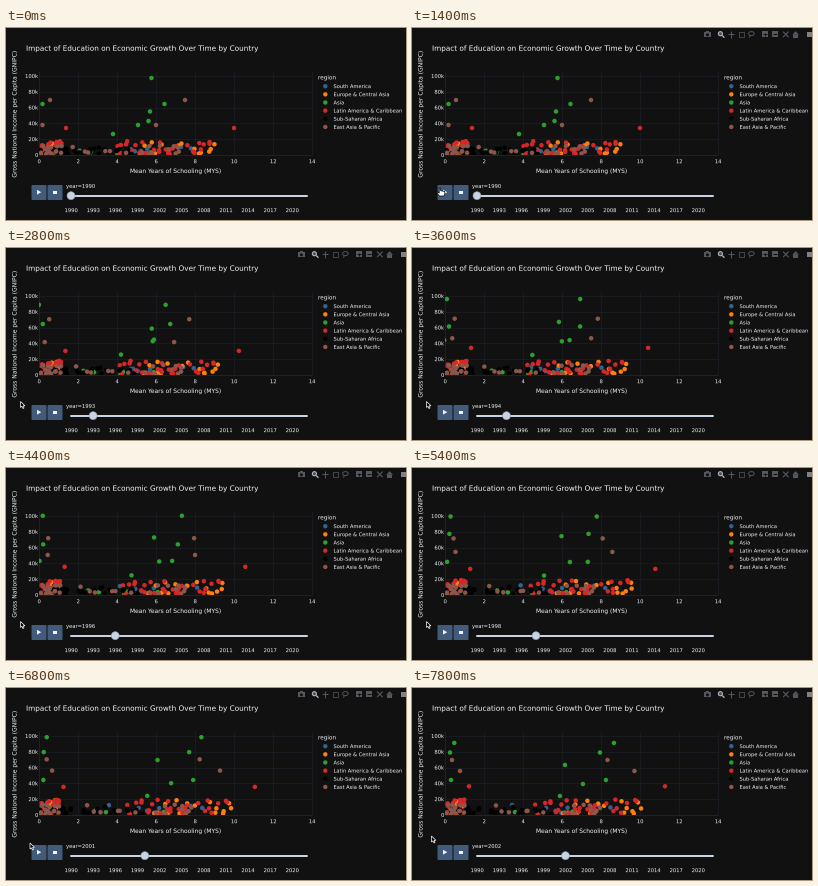
Write a matplotlib script that moves like this. It is 400 px wide and 192 px high and loops after 8000 ms.

```python
import numpy as np
import matplotlib.pyplot as plt
from matplotlib.animation import FuncAnimation
from matplotlib.patches import Circle, FancyBboxPatch, PathPatch, Polygon, Rectangle
from matplotlib.textpath import TextPath
from matplotlib.transforms import Affine2D

W, H, DPI = 400, 192, 100
STEP, FRAMES = 200, 40
PX = 72 / DPI
BG, INK, GRID, PALE = "#111111", "#f2f5fa", "#1c2229", "#c8d4e3"
LEFT, RIGHT, TOP, BASE = 33, 306, 43, 127.3
X_UNIT, Y_UNIT = 19.5, 0.79

# Playback: one year every PERIOD ms, dots glide, the slider hops quickly
PLAY, PERIOD, GLIDE, HOP = 1590, 520, 500, 150
SPAN = 12
YEAR_PX = 7.37

REGIONS = [("South America", "#35618f"), ("Europe & Central Asia", "#ff7f0e"),
           ("Asia", "#2ca02c"), ("Latin America & Caribbean", "#d62728"),
           ("Sub-Saharan Africa", "#000000"), ("East Asia & Pacific", "#8c564b")]
BLUE, ORANGE, GREEN, RED, BLACK, BROWN = range(6)

fig = plt.figure(figsize=(W / DPI, H / DPI), dpi=DPI, facecolor=BG)
ax = fig.add_axes([0, 0, 1, 1])
ax.set_xlim(0, W)
ax.set_ylim(H, 0)
ax.axis("off")


def text_path(s, x, y, size, align=0.0, turn=0):
    path = TextPath((0, 0), s, size=size, prop={"family": "DejaVu Sans"})
    width = path.get_extents().x1
    place = (Affine2D().translate(-align * width, -0.365 * size)
             .rotate_deg(turn).scale(1, -1).translate(x, y))
    return path.transformed(place)


def label(*args, **kw):
    return ax.add_patch(PathPatch(text_path(*args, **kw), fc=INK, lw=0, zorder=4))


def line(xs, ys, color, px, z=1):
    return ax.plot(xs, ys, color=color, lw=px * PX, zorder=z,
                   solid_capstyle="butt")[0]


# Plot area
for k in range(0, 15, 2):
    x = LEFT + k * X_UNIT
    line([x, x], [TOP, BASE], GRID, 0.6 if k else 1)
    label(str(k), x, 133.3, 5.2, align=0.5)
for k in range(0, 101, 20):
    y = 127 - k * Y_UNIT
    line([LEFT, RIGHT], [y, y], GRID, 0.6 if k else 1)
    label(f"{k}k" if k else "0", 32, y, 5.2, align=1)

label("Impact of Education on Economic Growth Over Time by Country", 20, 20.1, 7.26)
label("Mean Years of Schooling (MYS)", 169.3, 142.8, 5.94, align=0.5)
label("Gross National Income per Capita (GNIPC)", 8.3, 86.5, 6.03, align=0.5, turn=90)

# Legend
label("region", 312, 49.3, 5.7)
for i, (name, color) in enumerate(REGIONS):
    y = 58.2 + 8.15 * i
    ax.add_patch(Circle((319.3, y), 2.2, fc=color, lw=0))
    label(name, 327.5, y, 5.1)

# Buttons and slider
for x in (25.5, 41.5):
    ax.add_patch(FancyBboxPatch((x + 1, 158), 13, 13, fc="#435b7b", lw=0,
                                boxstyle="round,pad=1,rounding_size=1"))
ax.add_patch(Polygon([(31, 161.8), (31, 166.6), (35.3, 164.2)], fc=INK, lw=0))
ax.add_patch(Rectangle((47.2, 162.5), 3.4, 3.4, fc=INK, lw=0))
ax.plot([65, 301], [167.7, 167.7], color=PALE, lw=2 * PX, zorder=2,
        solid_capstyle="round")
for k in range(0, 31, 3):
    label(str(1990 + k), 65 + k * YEAR_PX, 182.2, 5.2, align=0.5)
knob = ax.add_patch(Circle((65, 167.7), 4, fc=PALE, ec="#8f9bab", lw=0.4, zorder=3))
year_text = label("year=1990", 60, 158, 5.2)

# Toolbar shown while the pointer is over the chart
DIM, LIT = "#55595f", "#b4b8be"
bar = []


def solid(shape, color=DIM):
    shape.set(fc=color, lw=0)
    bar.append(ax.add_patch(shape))


def stroke(xs, ys, color=DIM, px=1.0):
    bar.append(line(xs, ys, color, px, z=3))


def zoom_icon(x, plus):
    solid(Rectangle((x - 3, 3.4), 6, 6))
    stroke([x - 1.8, x + 1.8], [6.4, 6.4], BG)
    if plus:
        stroke([x, x], [4.6, 8.2], BG)


# camera, magnifier
solid(Rectangle((292, 4.3), 6.8, 5))
solid(Rectangle((294, 3.3), 2.8, 1.2))
solid(Circle((295.4, 6.8), 1.5), BG)
solid(Circle((308.4, 5.7), 2.6), LIT)
solid(Circle((308.4, 5.7), 1.5), "#4a4d52")
stroke([310.2, 312.4], [7.5, 9.7], LIT, 1.3)
# pan, box, lasso
stroke([316, 322.4], [6.4, 6.4])
stroke([319.2, 319.2], [3.1, 9.7])
stroke([326.8, 332.4, 332.4, 326.8, 326.8], [3.7, 3.7, 9.2, 9.2, 3.7], px=0.7)
turn = np.linspace(0, 2 * np.pi, 24)
stroke(339.4 + 2.8 * np.cos(turn), 5.6 + 2 * np.sin(turn), px=0.9)
stroke([337.6, 338.2, 337.2], [7.4, 8.4, 9.6], px=0.9)
# zoom in and out, fit, home
zoom_icon(353, True)
zoom_icon(363.2, False)
for s in (-1, 1):
    stroke([371, 376.6], [6.4 - 2.8 * s, 6.4 + 2.8 * s], px=1.1)
solid(Polygon([(380.2, 6.8), (383.6, 3.2), (387, 6.8)]))
solid(Rectangle((381.3, 6.5), 4.6, 3))
solid(Rectangle((394.5, 4), 5, 5), "#7d8288")

# Countries: each has a dot at its value and a twin near the left axis
dots = []


def spread(values, p):
    return np.interp(p, np.linspace(0, 1, len(values)), values)


def country(region, x0, x1, ys, bend=0.0, twin=()):
    """Slide from x0 to x1, with heights spaced evenly over the whole span."""
    dots.append((region, lambda p: (x0 + (x1 - x0) * (p + bend * p * (1 - p)),
                                    spread(ys, p))))
    if twin:
        dots.append((region, lambda p: (spread(twin, p), spread(ys, p))))


country(GREEN, 145.5, 202, (50, 57, 47.5, 48.5, 48, 55), 0.35, (30, 37.5, 42.3))
country(GREEN, 158.5, 188, (76, 76, 80, 66, 64, 64.5), 0, (36.5, 38))
country(GREEN, 144, 153, (83.5, 80.5, 70, 68, 71, 77))
country(GREEN, 142.5, 171, (93, 93.5, 96), -0.3)
country(GREEN, 132, 194, (97, 91.5, 92.5, 94, 92, 92), 0.4, (29, 39))
country(GREEN, 107, 148, (106, 107.5, 108))
country(BROWN, 179, 195.5, (72, 70, 72), 0.4, (44, 40))
country(BROWN, 150, 222.5, (97, 94, 88, 84, 82.5, 83), 0.35, (36.5, 48))
country(RED, 228, 253, (100, 103, 98, 101, 99, 98.3), 0, (60, 57))
country(BLUE, 135, 100, (123, 117.5, 117), 0.6)

rng = np.random.default_rng(12)


def drifter(region, x, pace, y, rise, phase):
    def place(p):
        wobble = 0.06 * (126 - y) * np.sin(9.6 * p + phase)
        return x + pace * p, y - rise * p + wobble
    dots.append((region, place))


def crowd(region, count, lo, hi, top, near, drift):
    """Low-income pairs: right dots drift with time, twins stay by the axis."""
    for _ in range(count):
        x, side = rng.uniform(lo, hi), rng.uniform(34, near)
        y = 126 - (126 - top) * rng.random() ** 1.2
        rise = 0.3 * (126 - y) * rng.random()
        phase = rng.uniform(0, 2 * np.pi)
        drifter(region, x, drift * rng.uniform(0.5, 1.1), y, rise, phase)
        drifter(region, side, 0.14 * (33 - side), y, rise, phase)


crowd(BLUE, 6, 120, 202, 118, 52, 14)
crowd(ORANGE, 15, 132, 213, 113.5, 56, 32)
crowd(GREEN, 5, 60, 170, 121, 48, 19)
crowd(RED, 30, 108, 204, 113, 58, 19)
crowd(BLACK, 26, 42, 128, 119.5, 62, 14)
crowd(BROWN, 16, 62, 175, 117.5, 56, 17)
dots.sort(key=lambda d: d[0])

cloud = ax.scatter(np.zeros(len(dots)), np.zeros(len(dots)), s=(4.5 * PX) ** 2,
                   c=[REGIONS[r][1] for r, _ in dots], linewidths=0, zorder=2)
cloud.set_clip_path(Rectangle((LEFT, TOP), RIGHT - LEFT, BASE - TOP,
                              transform=ax.transData))

# Pointer: an arrow, or a hand over the buttons
ARROW = np.array([(0, 0), (0, 6), (1.4, 4.8), (2.5, 7), (3.5, 6.5),
                  (2.6, 4.4), (4.4, 4.3)])
HAND = np.array([(-0.8, 0), (0.5, 0), (0.7, 2.8), (4.6, 3.4), (5, 5.4), (3.9, 8),
                 (-0.6, 8), (-3.2, 4.8), (-2.4, 4), (-0.8, 5.2)])
arrow = ax.add_patch(Polygon(ARROW, fc="black", ec="white", lw=0.5, zorder=9))
hand = ax.add_patch(Polygon(HAND, fc="white", ec="black", lw=0.5, zorder=9))
ENTER = 600
WHEN = [ENTER, 1200, 1600, 2000, 6200, 6800, 7800]
POINT_X = [40, 28, 28, 14.5, 14.5, 24, 19.5]
POINT_Y = [192, 160, 160, 153.5, 153.5, 155, 148]


def playback(t):
    """Years begun, dot position in years and slider position in years."""
    if t < PLAY:
        return 0, 0.0, 0.0
    done, since = divmod(t - PLAY, PERIOD)
    hop = min(1, since / HOP)
    return done + 1, done + min(1, since / GLIDE), done + hop * hop * (3 - 2 * hop)


def draw(i):
    t = i * STEP
    year, now, slide = playback(t)
    cloud.set_offsets([place(now / SPAN) for _, place in dots])
    knob.center = (65 + slide * YEAR_PX, 167.7)
    year_text.set_path(text_path(f"year={1990 + year}", 60, 158, 5.2))

    inside = t >= ENTER
    for part in bar:
        part.set_visible(inside)
    x, y = np.interp(t, WHEN, POINT_X), np.interp(t, WHEN, POINT_Y)
    on_button = 25 < x < 57 and 157 < y < 172
    arrow.set_xy(ARROW + (x, y))
    hand.set_xy(HAND + (x, y))
    arrow.set_visible(inside and not on_button)
    hand.set_visible(inside and on_button)
    return []


anim = FuncAnimation(fig, draw, frames=FRAMES, interval=STEP, repeat=True,
                     repeat_delay=0, blit=False)
plt.show()
```
